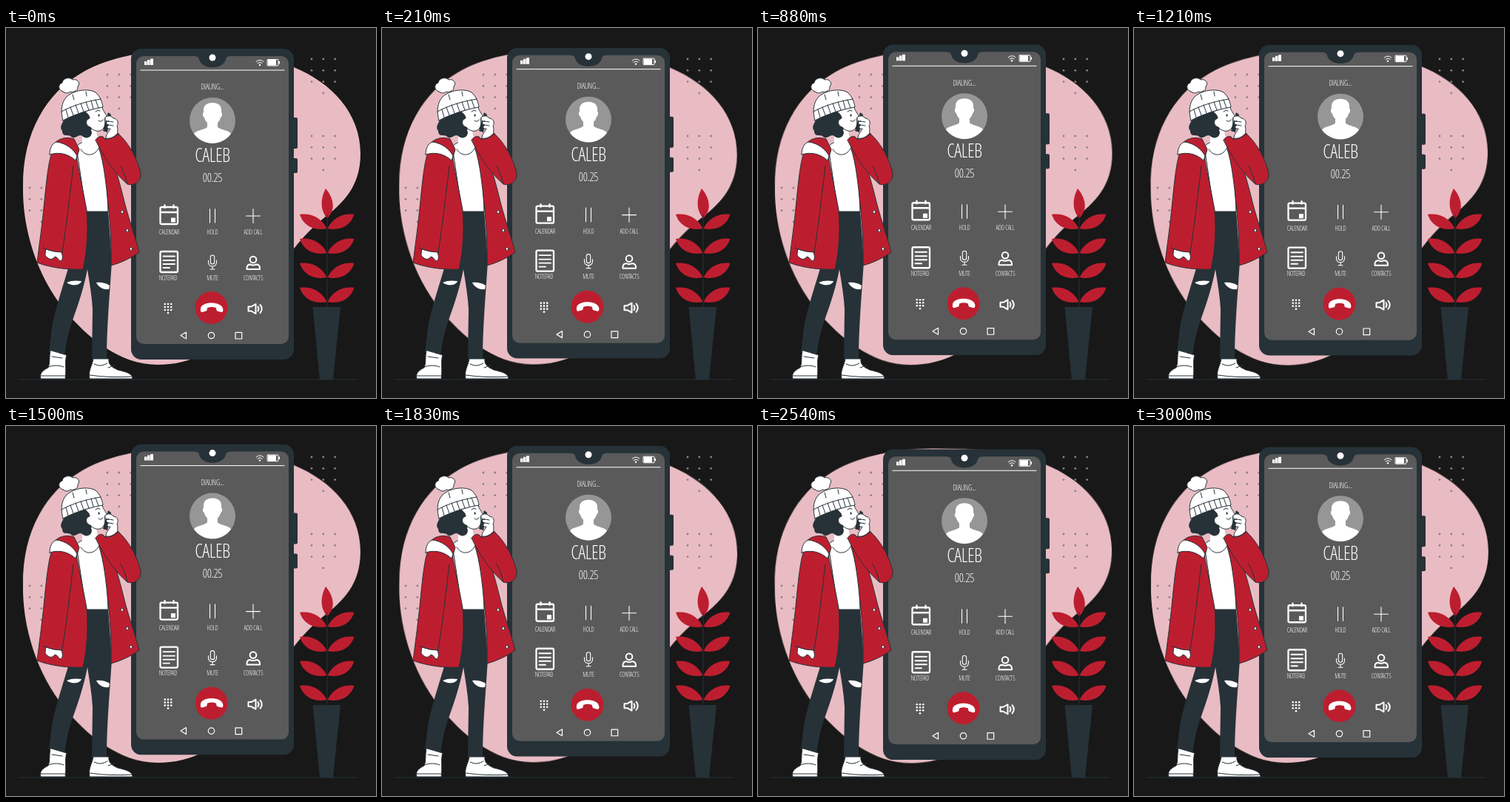
An HTML page that plays this animation: 500 by 500 pixels, repeating every 3.04 s.

```html
<!DOCTYPE html>
<html lang="en">
<head>
<meta charset="utf-8">
<title>Dialing</title>
<style>
  html, body { margin: 0; width: 100%; height: 100%; overflow: hidden; background: #181818; }
  svg { display: block; width: 100vw; height: 100vh; }
  .dark { fill: #263238; }
  .red { fill: #bd1e2f; }
  .white { fill: #fff; }
  .ink { stroke: #263238; stroke-width: 1; stroke-linejoin: round; stroke-linecap: round; }
  .line { fill: none; }
  .icon { fill: none; stroke: #fff; stroke-linejoin: round; stroke-linecap: round; }
  #blob { transform-box: fill-box; transform-origin: center; }
  text {
    fill: #fff; text-anchor: middle; font-weight: 300; letter-spacing: -.02em;
    font-family: 'Open Sans Condensed Light', 'Roboto Condensed Light', 'Roboto Condensed', Roboto, sans-serif;
  }
  .label { font-size: 8.6px; }
</style>
</head>
<body>
<svg viewBox="0 0 500 500">
  <path id="blob" fill="#e9bcc3" d="M23 215C22 140 56 88 100 62C133 42 180 30.500 238 30.300C300 31 345 35 389 53C440 74 479 115 479 170C479 215 455 237 428 258C404 278 392 294 374 318C332 372 300 455 205 455C152 455 108 416 80 382C41 335 22 270 23 215Z"/>
  <g id="dots" fill="#8a8486"></g>
  <path class="ink line" d="M18 475H474"/>

  <g id="plant" class="red">
    <path d="M434 257C424 246 425 230 432 217C443 230 446 246 434 257Z"/>
  </g>
  <path class="ink line" d="M434 252V378"/>
  <path class="dark" d="M414.500 377H452L442 475H424Z"/>

  <g id="phone">
    <rect class="dark" x="384" y="121" width="10" height="42" rx="2"/>
    <rect class="dark" x="384" y="176" width="10" height="20" rx="2"/>
    <rect class="dark" x="169" y="28" width="220" height="420" rx="14"/>
    <rect x="176" y="38" width="206" height="389" rx="10" fill="#5a5a5a"/>
    <path class="dark" d="M254 36V38Q260 38 261 42C264 57 294 57 297 42Q298 38 304 38V36Z"/>
    <circle class="white" cx="279" cy="40" r="4.500"/>
    <path class="icon" stroke-width="1" d="M182 57H376"/>

    <path class="white" d="M187 50V45H190.500V50ZM191 50V43H194.500V50ZM195 50V41.500H199V50Z"/>
    <path class="icon" stroke-width="1" d="M338 45.500Q343 41 348 45.500M340 47.500Q343 45 346 47.500"/>
    <circle class="white" cx="343" cy="50" r="1.200"/>
    <rect class="icon" x="353" y="42.500" width="15" height="8.500" rx="1"/>
    <path class="white" d="M354 43H365V50.500H354ZM368.500 45H370V48.500H368.500Z"/>

    <text x="279" y="83.500" font-size="10">DIALING...</text>
    <circle cx="279" cy="125" r="31" fill="#969696"/>
    <path class="white" d="M279 101C288 101 292 106 291 114C293 115 292 120 290 121C289 125 287 127 286 128V134C291 138 301 138 304 143A31 31 0 0 1 254 143C257 138 267 138 272 134V128C271 127 269 125 268 121C266 120 265 115 267 114C266 106 270 101 279 101Z"/>
    <text x="279" y="181" font-size="25">CALEB</text>
    <text x="279" y="208" font-size="15.500">00.25</text>

    <g class="icon" stroke-width="2.300">
      <rect x="208.500" y="242" width="23.500" height="23" rx="2"/>
      <path d="M209 249H232M214.500 239.500V243M226.500 239.500V243"/>
      <rect x="208.500" y="302" width="23.500" height="28" rx="2"/>
      <path stroke-width="1.900" d="M212.500 308.500H228M212.500 314H228M212.500 319H228M212.500 324H221"/>
    </g>
    <rect class="white" x="223" y="256.500" width="6" height="6"/>
    <path class="icon" stroke-width="1.100" d="M275.500 244.500V263M282.500 244.500V263M324.500 254H343.500M334 244.500V263.500"/>
    <g class="icon" stroke-width="1.100">
      <rect x="276.300" y="307" width="5.400" height="12" rx="2.700"/>
      <path d="M273.500 314V317Q274 322 279 322Q284 322 284.500 317V314M279 322V326M276 326H282"/>
    </g>
    <g class="icon" stroke-width="2">
      <circle cx="334" cy="313" r="4.300"/>
      <path d="M325.500 326V324Q326 319.500 330 319.500Q334 321.500 338 319.500Q342.500 319.500 343 324V326Z"/>
    </g>
    <g id="labels"></g>

    <g id="keys" class="white"></g>
    <circle class="red" cx="277.500" cy="378" r="22"/>
    <path class="white" d="M263 379C264 369 291 369 293 379C294 382 293 384 291 384L285.500 382.500C284 382 284.500 379 283.500 378Q278 376 272.500 378C271.500 379 272 382 270.500 382.500L265 384C263 384 262.500 382 263 379Z"/>
    <g class="icon" stroke-width="2">
      <path d="M327.500 376.500H331.500L337.500 373V386L331.500 382.500H327.500Z"/>
      <path d="M340.500 376.500Q342.500 379.500 340.500 382.500M343.500 374Q348 379.500 343.500 385"/>
    </g>
    <g class="icon" stroke-width="1.200">
      <path d="M236 415.500L243.500 411V420Z"/>
      <circle cx="277.500" cy="415.500" r="4.200"/>
      <rect x="310" y="411.300" width="8.700" height="8.700"/>
    </g>
  </g>

  <g id="woman">
    <!-- legs and shoes -->
    <path class="dark" d="M109 246L84 325C76 352 65 385 62 405L58 438L79 445C81 425 85 408 91 392C98 372 105 352 110 326C113 345 116 362 117 380L116 448L136 448C136 420 138 385 141 345L143 315L138 246Z"/>
    <path class="white" d="M82 344C88 341 95 341 102 342C101 347 90 350 82 344ZM122 344C129 343 136 345 140 348L139 353C131 354 125 350 122 344Z"/>
    <g class="white ink">
      <path d="M60 435.500L82 442C79 450 82 461 80 474H47C45 467 49 463 57 459C60 453 58 444 60 435.500Z"/>
      <path class="line" d="M47 470H80M57 458Q68 454 78 458M62 444L76 446"/>
      <path d="M118 447H139C138 454 142 458 151 462C163 465 171 467 171 474H113C111 462 116 458 118 447Z"/>
      <path class="line" d="M113 469Q140 473 171 471M138 459L147 456M119 454Q128 459 137 453"/>
    </g>

    <!-- shirt, coat -->
    <path class="white ink" d="M95 160C105 150 120 150 130 162L136 200L138 248H108L98 180Z"/>
    <path class="red ink" d="M125 148L135 150C143 175 153 205 160 235C167 262 175 283 180 303C169 311 156 317 142 321C143 290 140 258 138 238C135 210 133 185 125 160Z"/>
    <path class="red ink" d="M62 168C55 188 53 230 48 270L42 317C60 324 84 327 104 326C110 300 111 270 109 246C104 218 98 192 95 174C84 160 72 160 62 168Z"/>
    <path class="ink line" d="M91 186C87 220 82 265 76 303M50 297Q62 303 76 303"/>
    <path class="white ink" d="M54 299Q65 303 75 303C77 309 77 314 73 315C70 311 68 309 66 309C62 315 56 312 53 307Z"/>
    <path class="red ink" d="M64 158C69 150 80 146 92 150L99 164L95 178C86 165 74 160 64 158Z"/>
    <path class="white ink" d="M59 171C59 163 62 156 68 154C80 155 92 164 96 173L94 179C84 170 72 167 59 171Z"/>
    <g class="white ink">
      <circle cx="157" cy="248.500" r="1.900"/><circle cx="164" cy="273.500" r="1.900"/><circle cx="169" cy="298.500" r="1.900"/>
    </g>

    <!-- head -->
    <path class="white" d="M104 135L102 164C109 174 120 171 126 162L122 138Z"/>
    <path class="ink line" d="M101 164C108 175 121 173 126 161"/>
    <path class="dark" d="M78 116C82 126 70 131 76 139C76 149 87 143 88 147C93 152 98 142 103 146C109 152 119 146 115 138L119 128L116 108Z"/>
    <path class="white ink" d="M107 113L130 105C130 111 134 114 136 119C136 122 133 122 133 123C135 130 133 137 127 139C122 140 117 138 114 134C108 133 106 124 113 122C113 118 110 116 107 113Z"/>
    <path class="ink line" d="M125 125Q129 128 131 124M121 113Q124 110 127 112"/>
    <ellipse class="dark" cx="125.500" cy="118" rx="1.100" ry="1.700"/>
    <path class="white ink" d="M77 125C74 114 74 101 82 93C91 84 111 81 121 87C127 92 130 100 131 107C113 110 94 116 77 125Z"/>
    <path class="ink line" d="M75 113C91 104 110 99 128 96M81 110L84 121M87 107L91 118M94 104L98 115M101 102L105 113M108 100L112 111M115 98L118 109M121 97L125 108M90 90L92 97M108 86L109 92"/>
    <path class="white ink" d="M77 86C70 84 70 76 76 74C77 67 87 66 90 70C97 68 101 75 97 79C98 86 89 87 87 86C84 89 79 88 77 86Z"/>

    <!-- raised arm -->
    <path class="red ink" d="M121 151Q129 142 134 150L151 142C166 155 178 178 182 196C183 208 173 214 164 211C150 199 138 183 128 165Z"/>
    <path class="ink line" d="M134 150C140 151 148 147 152 143M155 187Q160 194 164 211"/>
    <path class="dark" d="M138 114L142 117L137 141L131 139Z"/>
    <path class="white ink" d="M134 121C138 117 143 119 145 122C150 122 153 128 150 132C152 137 150 140 151 142C146 148 140 150 135 149C135 143 139 141 141 136C137 137 135 133 139 131C134 130 135 126 139 126C135 126 133 124 134 121Z"/>
    <path class="ink line" d="M139 126L145 127M139 131L145 132"/>
  </g>
</svg>
<script>
const LOOP = 3040;
const byId = id => document.getElementById(id);

function add(parent, tag, attrs, text = '') {
  const el = document.createElementNS('http://www.w3.org/2000/svg', tag);
  for (const [key, value] of Object.entries(attrs)) el.setAttribute(key, value);
  el.textContent = text;
  byId(parent).append(el);
}

const dot = (parent, cx, cy, r) => add(parent, 'circle', { cx, cy, r });

// Grids of 3 by 3 dots with one more below
for (const [x, y] of [[137, 63], [32, 216], [413, 42], [413, 146]]) {
  for (let i = 0; i < 9; i++) dot('dots', x + i % 3 * 15.8, y + Math.floor(i / 3) * 15.3, 1.4);
  dot('dots', x + 15.8, y + 45.9, 1.4);
}

for (let i = 0; i < 9; i++) dot('keys', 214.8 + i % 3 * 4.2, 373 + Math.floor(i / 3) * 4, 1.3);
dot('keys', 219, 385, 1.3);

for (const [x, y, name] of [
  [220.5, 279, 'CALENDAR'], [279, 279, 'HOLD'], [334, 279, 'ADD CALL'],
  [219, 340.7, 'NOTEPAD'], [279, 340.7, 'MUTE'], [334, 340.7, 'CONTACTS']
]) add('labels', 'text', { x, y, class: 'label' }, name);

for (const y of [271, 304, 337, 370]) {
  add('plant', 'path', { d: `M433.500 ${y}c-8-16-23-21-36.500-19c6 18 23 22 36.500 19z` });
  add('plant', 'path', { d: `M434.500 ${y}c8-16 23-21 36-19c-6 18-23 22-36 19z` });
}

function play(id, duration, steps) {
  const frames = steps.map(([offset, transform]) => ({ offset, transform }));
  byId(id).animate(frames, { duration, iterations: Infinity });
}

play('phone', LOOP, [
  [0, 'translateY(0px)'], [1 / 3, 'translateY(-6.6px)'],
  [5 / 6, 'translateY(3.3px)'], [1, 'translateY(0px)']
]);
play('blob', LOOP / 2, [
  [0, 'rotate(0deg)'], [.25, 'rotate(1deg)'], [.75, 'rotate(-1deg)'], [1, 'rotate(0deg)']
]);
</script>
</body>
</html>
```
